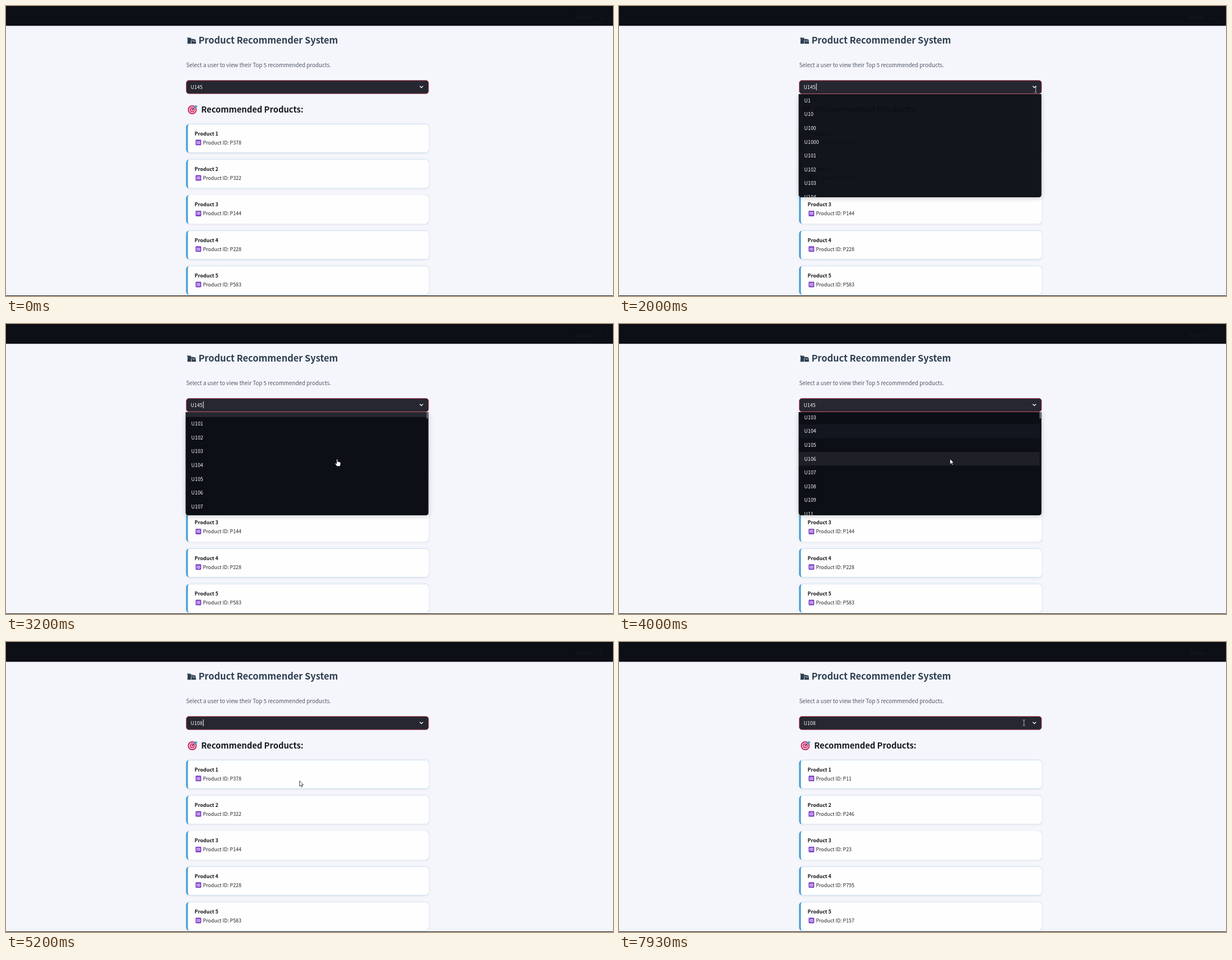
An HTML page that plays this animation: 1083x517 px, repeating every 8 s.

```html
<!DOCTYPE html>
<html lang="en">
<head>
<meta charset="utf-8">
<title>Product Recommender System</title>
<style>
  html, body { margin: 0; width: 100%; height: 100%; overflow: hidden; background: #f5f6fb; }
  svg { display: block; width: 100%; height: 100%; }
  text { font: 8.9px "Noto Sans CJK JP", "Noto Sans CJK SC", "Noto Sans CJK", "Noto Sans", sans-serif; white-space: pre; }
  .bold { font-weight: 700; }
  .title { font-size: 16.4px; font-weight: 700; fill: #2c3e50; }
  .intro { font-size: 9.8px; fill: #4f5866; }
  .head { font-size: 14.75px; font-weight: 600; fill: #15171c; }
  .dim { font-size: 8.9px; fill: #1a1b20; }
  .card { filter: drop-shadow(0 1.5px 2px rgba(30, 40, 60, .09)); }
  .menu { filter: drop-shadow(0 2px 4px rgba(0, 0, 0, .2)); }
  .item { font-weight: 500; fill: #fafafa; }
</style>
</head>
<body>
<svg id="stage" viewBox="0 0 1083 517">
  <defs><clipPath id="list"><path d="M320.5 157H753.7V336.5a4.5 4.5 0 0 1-4.5 4.5H325a4.5 4.5 0 0 1-4.5-4.5Z"/></clipPath></defs>
  <rect width="1083" height="517" fill="#f5f6fb"/>
  <rect width="1083" height="35.3" fill="#0c0f16"/>
  <text class="dim" x="1017" y="23.3">Deploy</text>
  <g fill="#1a1b20"><circle cx="1061" cy="16.5" r="1"/><circle cx="1061" cy="20" r="1"/><circle cx="1061" cy="23.5" r="1"/></g>
  <rect y="516" width="1083" height="1" fill="#14161b"/>

  <path fill="#2c3e50" d="M323 55.5l2.6 1.6 1.2-1.4 1 1.6 2.2-1 .6 3 1.6-.9 6 1.3 .9 7.6H323.6l.5-7.6Z"/>
  <path fill="none" stroke="#f5f6fb" stroke-width=".8" d="M330.9 60.5l-.5 6.8M333.3 60.8q.4 2.6 1.6 2.6t1.7-2.2"/>
  <text class="title" x="343.4" y="67">Product Recommender System</text>
  <text class="intro" x="321.5" y="109.2">Select a user to view their Top 5 recommended products.</text>

  <g transform="translate(332.3 185)">
    <circle r="8" fill="#c9265f"/><circle r="6" fill="#f3e3ec"/><circle r="4.5" fill="#d42a66"/>
    <circle r="2.6" fill="#f3e3ec"/><circle r="1.4" fill="#c9265f"/>
    <path d="M0 0L6-5.5" stroke="#35546e" stroke-width="1.1"/>
    <path d="M3.8-5.2L7-9l.6 2.2 2.2.5-3.8 3.2-2.2-.3Z" fill="#3a9bdc"/>
  </g>
  <text class="head" x="348.2" y="190">Recommended Products:</text>
  <g id="cards"></g>

  <rect x="321.7" y="132.7" width="432.2" height="23.6" rx="4.5" fill="#262730" stroke="#b93850" stroke-width=".9"/>
  <text id="value" class="item" x="329.4" y="147.5"></text>
  <rect id="caret" x="351.6" y="138" width="1" height="12.3" fill="#fafafa"/>
  <path d="M738.2 142.8l2.9 2.8 2.9-2.8" fill="none" stroke="#fafafa" stroke-width="1.35"/>

  <g id="menu" class="menu">
    <path d="M320.5 157H753.7V336.5a4.5 4.5 0 0 1-4.5 4.5H325a4.5 4.5 0 0 1-4.5-4.5Z" fill="#0c0f16"/>
    <g clip-path="url(#list)">
      <g id="rows"></g>
      <rect id="thumb" x="750.3" y="157" width="3" height="11.3" fill="#6d6e74"/>
    </g>
  </g>

  <g id="arrow"><path d="M0 0V9.6L2.3 7.5 3.9 11 5.4 10.3 3.9 7H6.9Z" fill="#fff" stroke="#16181d" stroke-width=".8" stroke-linejoin="round"/></g>
  <g id="hand"><path d="M-.9 1a.9.9 0 0 1 1.8 0V5l.6-.4 1.4.3 1.4.4 1.3.5.5 1V9.5L5 12.8H-.4L-3.4 8.6q-.5-1.4.6-1.4L-.9 8.6Z" fill="#fff" stroke="#16181d" stroke-width=".6"/></g>
  <g id="beam"><path d="M-2.3-5H-.7L0-4.4.7-5H2.3M0-4.4V4.4M-2.3 5H-.7L0 4.4.7 5H2.3" fill="none" stroke="#c8c9ce" stroke-width=".9"/></g>
</svg>
<script>
const LOOP = 8000, PITCH = 24.55, CLICK_OPEN = 1940, CLICK_PICK = 4900;
const $ = id => document.getElementById(id);
const before = ["P378", "P322", "P144", "P228", "P583"];
const after = ["P11", "P246", "P23", "P795", "P157"];
const users = ["U1", "U10", "U100", "U1000"];
for (let n = 101; n < 110; n++) users.push("U" + n);
users.push("U11", "U110", "U111", "U112");

$("cards").innerHTML = before.map((_, i) => `
  <g transform="translate(321.4 ${210.5 + 63.3 * i})">
    <g class="card">
      <rect width="432.6" height="51" rx="5.5" fill="#3d9ad6"/>
      <path d="M5.5 0H427.1a5.5 5.5 0 0 1 5.5 5.5V45.5a5.5 5.5 0 0 1-5.5 5.5H5.5A2.5 5.5 0 0 1 3 45.5V5.5A2.5 5.5 0 0 1 5.5 0Z" fill="#fefefe"/>
    </g>
    <text class="bold" x="15.2" y="20.4" fill="#15171c">Product ${i + 1}</text>
    <rect x="16.9" y="27.8" width="10" height="10" rx="1.4" fill="#8446c8"/>
    <text class="bold" x="21.9" y="35.3" text-anchor="middle" style="font-size:6.6px" fill="#fff">ID</text>
    <text class="pid" x="30" y="36.3" fill="#24262b"></text>
  </g>`).join("");

$("rows").innerHTML = users.map((u, i) => `
  <g transform="translate(321 ${156.3 + PITCH * i})">
    <rect class="glow" width="429.3" height="${PITCH}" fill="#262730"/>
    <text class="item" x="9.6" y="15.6">${u}</text>
  </g>`).join("");

const ids = [...document.querySelectorAll(".pid")];
const glows = [...document.querySelectorAll(".glow")];

// time, value(s)
const path = [[0, 908, -20], [130, 902, 16], [800, 742, 146], [1900, 743.5, 149], [2070, 743.5, 149],
  [2600, 591, 241], [4100, 590.5, 240.5], [4450, 526, 246], [5000, 525, 247], [5700, 518.5, 250],
  [6130, 518.5, 250], [6900, 579, 232], [7750, 722.5, 144]];
const scroll = [[0, 0], [2750, 0], [3090, 88.7], [3560, 88.7], [3850, 149.3], [4130, 149.3], [4400, 183.9]];
const shapes = [[0, ""], [130, "arrow"], [800, "beam"], [2150, "hand"], [3850, "arrow"],
  [4200, "hand"], [5050, "arrow"], [7600, "beam"]];
const hover = [[2260, 0], [2340, 1], [2400, 2], [2480, 3], [3330, 7], [3880, 9], [4330, 10], [4435, 11]];

const clamp = v => Math.min(1, Math.max(0, v));
const ramp = (t, start, len) => clamp((t - start) / len);

function along(keys, t) {
  const n = keys.findIndex(k => k[0] > t);
  if (n < 0) return keys[keys.length - 1].slice(1);
  const a = keys[n - 1], b = keys[n];
  const p = (t - a[0]) / (b[0] - a[0]), e = p * p * (3 - 2 * p);
  return a.slice(1).map((v, i) => v + (b[i + 1] - v) * e);
}

function caretOn(t) {
  const from = t >= CLICK_PICK ? CLICK_PICK : t >= CLICK_OPEN ? CLICK_OPEN : 300;
  return t >= from && (t - from) % 1060 < 530;
}

function draw(t) {
  const list = t < 5470 ? before : after;
  ids.forEach((el, i) => el.textContent = "Product ID: " + list[i]);
  $("value").textContent = t < CLICK_PICK + 30 ? "U145" : "U108";
  $("caret").style.opacity = caretOn(t) ? 1 : 0;

  const shown = ramp(t, 1932, 70) * (1 - ramp(t, 4930, 150));
  $("menu").style.opacity = shown;
  $("menu").style.display = shown ? "" : "none";
  $("thumb").style.opacity = ramp(t, 2100, 100);
  $("rows").setAttribute("transform", `translate(0 ${-along(scroll, t)[0]})`);
  glows.forEach(el => el.style.opacity = 0);
  hover.forEach(([on, row], i) => {
    const off = i + 1 < hover.length ? hover[i + 1][0] : LOOP;
    glows[row].style.opacity = ramp(t, on, 170) * (1 - ramp(t, off, 170));
  });

  const [x, y] = along(path, t);
  const shape = shapes.filter(s => s[0] <= t).pop()[1];
  for (const id of ["arrow", "hand", "beam"]) {
    $(id).style.display = id === shape ? "" : "none";
    $(id).setAttribute("transform", `translate(${x} ${y})`);
  }
}

const start = performance.now();
function tick() {
  const t = (performance.now() - start) % LOOP;
  draw(Math.floor(t * .015 + .01) / .015);
  requestAnimationFrame(tick);
}
tick();
</script>
</body>
</html>
```
